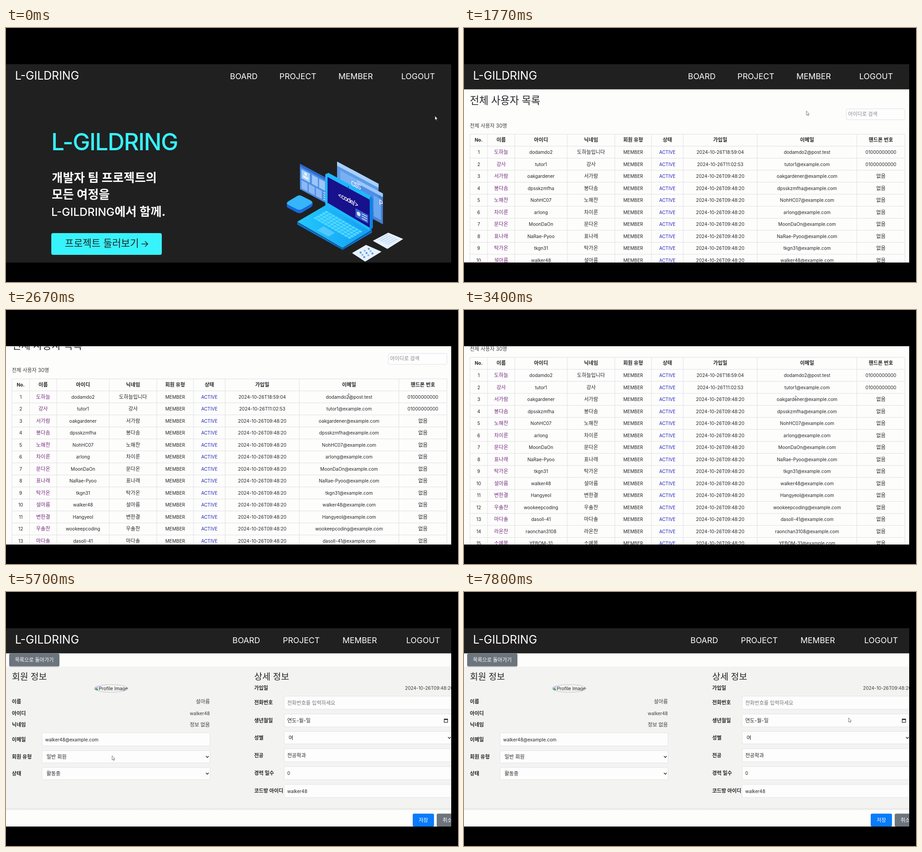
Write an HTML page that moves like this. It is 998 px wide and 561 px high and loops after 7.83 s.

```html
<!DOCTYPE html>
<html lang="ko">
<head>
<meta charset="utf-8">
<title>L-GILDRING</title>
<style>
html, body { margin: 0; width: 100%; height: 100%; overflow: hidden; background: #000; }
svg { display: block; width: 100%; height: 100%; }
text { font-family: Inter, "Noto Sans CJK KR", "Noto Sans CJK", sans-serif; white-space: pre; }
</style>
</head>
<body>
<svg id="stage" viewBox="0 0 998 561"></svg>
<script>
const LOOP = 7830;
const BRAND = 'L-GILDRING';
const DARK = '#202021', CYAN = '#37f3fb', INK = '#26262a', GRAY = '#6c757d';

const range = n => [...Array(n).keys()];
const isKorean = s => /[가-힣]/.test(s);

function text(x, y, s, size, fill = INK, opt = {}) {
  const { anchor = 'start', weight = 400, more = '' } = opt;
  return `<text x="${x}" y="${y}" font-size="${size}" fill="${fill}" text-anchor="${anchor}" font-weight="${weight}" ${more}>${s}</text>`;
}
// Body copy: Hangul is set a little larger than Latin.
const body = (x, y, s, fill, opt) => text(x, y, s, isKorean(s) ? 11.2 : 10.1, fill, opt);
const rect = (x, y, w, h, fill, more = '') =>
  `<rect x="${x}" y="${y}" width="${w}" height="${h}" fill="${fill}" ${more}/>`;
const poly = (points, fill, more = '') => `<polygon points="${points}" fill="${fill}" ${more}/>`;
const stroke = (d, color, width = 1) =>
  `<path d="${d}" fill="none" stroke="${color}" stroke-width="${width}"/>`;
const group = (id, inner) => `<g id="${id}">${inner}</g>`;
const plane = (m, inner) => `<g transform="matrix(${m})">${inner}</g>`;

function header(centers) {
  const nav = ['BOARD', 'PROJECT', 'MEMBER', 'LOGOUT'];
  return rect(0, 80, 983, 55.5, DARK) +
    text(20, 114, BRAND, 25, '#fff') +
    nav.map((s, i) => text(centers[i], 113, s, 17.7, '#fff', { anchor: 'middle' })).join('');
}
const NAV = [525, 644.5, 772, 910];
const NAV_WIDE = [530.5, 652, 781, 921];

function laptop() {
  const slope = '.88,.47,0,1,';
  const backs = plane(slope + '731,295',
      rect(0, 0, 104, 68, '#5d9bea') + rect(0, 0, 104, 9, '#a9d0fb') + rect(8, 16, 88, 46, '#78b0f2')) +
    plane(slope + '775,335',
      rect(0, 0, 65, 68, '#4c8be4', 'opacity=".9"') + rect(0, 0, 65, 8, '#9cc8fa') +
      rect(42, 15, 18, 46, '#6aa5ef') + text(55, 29, 'P', 16, '#e4f1ff', { weight: 500 })) +
    plane(slope + '731,295',
      text(35, 35, 'CSS', 15, '#e4f1ff', { weight: 500, more: 'letter-spacing="-2.6"' }));
  const left = plane(slope + '649,300',
    rect(0, 0, 80, 56, '#4d8fe5') + rect(0, 0, 80, 6, '#2f6bd0') +
    rect(4, 10, 21, 20, '#a8cffa') + '<circle cx="14" cy="16" r="3.4" fill="#e6f2ff"/>' +
    rect(8, 21, 13, 5, '#e6f2ff') +
    range(2).map(i => rect(30 + i * 18, 10, 15, 20, '#9bc6f8')).join('') +
    range(3).map(i => rect(4 + i * 18, 34, 15, 18, '#8ab9f4')).join('') +
    range(4).map(i => rect(59, 34 + i * 5, 15, 2, '#c9e2fd')).join(''));
  const cell = (c, r) => rect(c * 7.4 + 11, r * 9 + 38, 6.2, 7.4, '#4fd8ff');
  const base = poly('643,429 743,487 808,447 808,452 743,490 643,434', '#0b73d5') +
    poly('643,428 708,390 808,446 743,486', 'url(#deck)') +
    plane('1,.575,.65,-.38,643,428',
      range(11).map(c => range(5).map(r => cell(c, r)).join('')).join('') +
      rect(38, 9, 25, 22, '#4fc9fb'));
  const screen = poly('705,323 712,320 806,371 810,377 810,441 803,447 705,391', '#1fb8fa') +
    poly('806,371 810,377 810,441 803,447 803,375', '#0f83e3') +
    poly('710,329 803,379 803,441 710,386', '#17118c') +
    plane(slope + '710,329',
      text(51, 31, '&lt;code/&gt;', 15, '#fff', { anchor: 'middle', weight: 500, more: 'letter-spacing="-1.6"' }) +
      rect(70, 36, 32, 19, '#3b63d1') + '<circle cx="78" cy="45" r="4.6" fill="#d7e8ff"/>' +
      range(3).map(i => rect(86, 40 + i * 5, 13, 1.8, '#d7e8ff')).join('')) +
    '<circle cx="756" cy="351" r="1.2" fill="#0b3b8c"/>';
  const box = '<path d="M620 386V393Q620 396 624 398L643 408Q648 410 653 408L673 396Q677 393 677 390V384Z" fill="#1668d9"/>' +
    '<path d="M623 383L643 371Q648 368 653 371L673 381Q679 385 673 389L654 400Q648 403 642 400L624 391Q617 387 623 383Z" fill="#36b4fc"/>';
  const papers = poly('810,470 844,452 877,466 842,488', '#e7f1fc') +
    range(5).map(i => stroke(`M${822 + i * 5} ${468 + i * 2.4}l22 -12`, '#a9cdf3', 1.2)).join('') +
    poly('764,497 795,479 829,494 793,516', '#e7f1fc') +
    range(9).map(i => {
      const c = i % 3, r = (i - c) / 3;
      return `<circle cx="${783 + c * 9 + r * 4}" cy="${496 - c * 4 + r * 5}" r="2.3" fill="${i % 2 ? '#8fc0f3' : '#5b9ce8'}"/>`;
    }).join('');
  return backs + left + base + screen + box + papers;
}

function home() {
  const bold = { weight: 700 };
  return rect(0, 80, 983, 438, DARK) + header(NAV) +
    text(100, 270, BRAND, 51.5, CYAN, { weight: 500, more: 'letter-spacing="-1.5"' }) +
    text(101, 340, '개발자 팀 프로젝트의', 26.5, '#fff', bold) +
    text(101, 377, '모든 여정을', 26.5, '#fff', bold) +
    text(100, 415, `<tspan font-size="24.6" font-weight="500">${BRAND}</tspan>에서 함께.`, 26.5, '#fff', bold) +
    rect(100, 453, 244, 48, CYAN, 'rx="4"') +
    text(130, 483, '프로젝트 둘러보기', 21.4, '#202426') +
    stroke('M299 477H313M307 471L313 477L307 483', '#202426', 1.5) +
    laptop();
}

const PEOPLE = [
  ['도하늘', 'dodamdo2'], ['강사', 'tutor1'], ['서가람', 'oakgardener'], ['봉다솜', 'dpsskzmfha'],
  ['노해찬', 'NohHC07'], ['차이룬', 'arlong'], ['문다온', 'MoonDaOn'], ['표나래', 'NaRae-Pyoo'],
  ['탁가온', 'tkgn31'], ['설아름', 'walker48'], ['변한결', 'Hangyeol'], ['우솔찬', 'wookeepcoding'],
  ['마다솔', 'dasoll-41'], ['라온찬', 'raonchan3108'], ['소예봄', 'YEBOM-31']
];
const EDGES = [13, 52, 112, 228, 333, 414, 484, 647.5, 867.5, 973.5];
const HEADS = ['No.', '이름', '아이디', '닉네임', '회원 유형', '상태', '가입일', '이메일', '핸드폰 번호'];
const ROW = 26.53;

function list() {
  const mid = i => (EDGES[i] + EDGES[i + 1]) / 2;
  const cells = (vals, y, style) => vals.map((s, i) => body(mid(i), y, s, ...style(i))).join('');
  const lines = EDGES.map(x => `M${x} 234.5V${234.5 + ROW * 17}`).join('') +
    range(18).map(i => `M13 ${234.5 + ROW * i}H973.5`).join('');
  const times = ['18:59:04', '11:02:53'];
  const rows = PEOPLE.map(([name, id], i) => cells([
    i + 1, name, id, i ? name : name + '입니다', 'MEMBER', 'ACTIVE',
    '2024-10-26T' + (times[i] || '09:48:20'),
    id + (i ? '@example.com' : '@post.test'),
    i < 2 ? '01000000000' : '없음'
  ], 278 + ROW * i, c => [c === 1 ? '#752a80' : c === 5 ? '#2323bd' : INK, { anchor: 'middle' }])).join('');
  return rect(0, 80, 983, 700, '#fdfdfc') + header(NAV) +
    text(13, 168, '전체 사용자 목록', 22.2) +
    rect(844, 178.5, 129.5, 24, '#fefefe', 'rx="3" stroke="#e0e0ea"') +
    body(848, 193.5, '아이디로 검색', '#85858a') +
    body(13, 219.5, '전체 사용자 30명', '#3a3a3e') +
    stroke(lines, '#dfdfe9') +
    cells(HEADS, 251.3, () => [INK, { anchor: 'middle', weight: 700 }]) + rows;
}

const blank = () => rect(0, 80, 983, 438, '#fdfdfc') + header(NAV_WIDE) + body(0, 146.5, '정보 없음', '#3a3a3e');

function form() {
  const [name, id] = PEOPLE[9];
  const label = (x, y, s) => body(x, y + 4, s, INK, { weight: 700 });
  const value = (y, s) => body(450, y + 4, s, '#3a3a3e', { anchor: 'end' });
  const field = (x, w, y, h, s, pad = 7, color = INK) =>
    rect(x, y, w, h, '#fdfdfd', 'rx="3" stroke="#dfe2e8"') + body(x + pad, y + h / 2 + 4, s, color);
  const chevron = (x, y) => stroke(`M${x - 3} ${y - 1.5}l3 3l3 -3`, '#222', 1.5);
  const leftLabels = [['이름', 242], ['아이디', 268], ['닉네임', 293], ['이메일', 325.5], ['회원 유형', 364], ['상태', 401]];
  const rightLabels = [['가입일', 212], ['전화번호', 244], ['생년월일', 283.5], ['성별', 322], ['전공', 360.5], ['경력 일수', 399.5], ['코드방 아이디', 439]];
  return rect(0, 80, 983, 438, '#fdfdfc') + header(NAV_WIDE) +
    rect(0, 478, 983, 5, 'url(#shade)') + rect(0, 164.5, 983, 313.5, '#f3f3f1') +
    rect(7, 137, 111, 29, '#c8c8c8', 'rx="4"') + rect(7, 136, 111, 28, GRAY, 'rx="3"') +
    body(62.5, 153.7, '목록으로 돌아가기', '#fff', { anchor: 'middle' }) +
    text(13, 194, '회원 정보', 19.5) + text(548, 194, '상세 정보', 19.5) +
    `<g clip-path="url(#oval)">${rect(195, 207, 9, 10, '#bcd3ee')}${poly('195,217 199,211 204,217', '#58a55c')}` +
    text(205, 216.5, 'Profile Image', 10.3) + '</g>' +
    '<ellipse cx="232" cy="213" rx="37.5" ry="8.5" fill="none" stroke="#c2c2d0"/>' +
    leftLabels.map(([s, y]) => label(13, y, s)).join('') +
    value(242, name) + value(268, id) + value(293, '정보 없음') +
    field(79.5, 371, 311, 29, id + '@example.com') +
    field(79.5, 371, 350.5, 27, '일반 회원', 10) + chevron(444.5, 364) +
    field(79.5, 371, 387.5, 27, '활동중', 10) + chevron(444.5, 401) +
    rightLabels.map(([s, y]) => label(548, y, s)).join('') +
    body(881, 215.7, '2024-10-26T09:48:20', '#3a3a3e') +
    field(614, 380, 230, 29, '전화번호를 입력하세요', 7, '#77777c') +
    field(614, 380, 269.5, 28.5, '연도-월-일') +
    rect(967.5, 280.5, 7.5, 7.5, 'none', 'stroke="#222" stroke-width="1.2"') + rect(967, 280, 8.5, 2.5, '#222') +
    field(614, 380, 308, 27.5, '여', 10) + chevron(979, 322) +
    field(614, 380, 346, 29, '전공학과') +
    field(614, 380, 385.5, 29, '0') +
    field(614, 380, 425, 29, id) +
    rect(898, 489.5, 47, 28.5, '#0a7bfa', 'rx="3"') + body(921.5, 507.5, '저장', '#fff', { anchor: 'middle' }) +
    rect(951, 489.5, 48, 28.5, GRAY, 'rx="3"') + body(964, 507.5, '취소', '#fff');
}

const stage = document.getElementById('stage');
stage.innerHTML = `<defs>
  <clipPath id="view"><rect x="0" y="80" width="983" height="438"/></clipPath>
  <clipPath id="oval"><ellipse cx="232" cy="213" rx="37.5" ry="8.5"/></clipPath>
  <linearGradient id="shade" x2="0" y2="1"><stop stop-color="#e2e2e0"/><stop offset="1" stop-color="#fdfdfc"/></linearGradient>
  <linearGradient id="deck"><stop stop-color="#22c8fd"/><stop offset="1" stop-color="#129df5"/></linearGradient>
  </defs>` + rect(0, 0, 998, 561, '#000') +
  '<g clip-path="url(#view)">' +
  group('home', home()) + group('list', list()) + group('blank', blank()) + group('form', form()) +
  rect(0, 516, 88, 2, '#f1cdd3', 'id="strip"') +
  '<path id="cursor" d="M0 0V9.2L2.1 7.4L3.5 10.4L5 9.7L3.6 6.8H6.4Z" fill="#fff" stroke-width=".8"/></g>';

const el = Object.fromEntries(['home', 'list', 'blank', 'form', 'strip', 'cursor']
  .map(id => [id, document.getElementById(id)]));

// Pointer stops: time, x, y
const PATH = [
  [0, 947, 194], [740, 772, 104], [1000, 772, 104], [1550, 756, 183], [2200, 756, 184],
  [2750, 756, 184], [3250, 732, 189], [3450, 732, 189], [4550, 88, 381],
  [5350, 88, 381], [6550, 796, 288], [6850, 796, 288], [7600, 849, 278], [LOOP, 849, 278]
];
const smooth = u => { u = Math.min(1, Math.max(0, u)); return u * u * (3 - 2 * u); };

function pointer(t) {
  const i = PATH.findIndex(p => p[0] > t);
  const [t0, x0, y0] = PATH[i - 1], [t1, x1, y1] = PATH[i];
  const k = smooth((t - t0) / (t1 - t0));
  return [x0 + (x1 - x0) * k, y0 + (y1 - y0) * k];
}

function draw(t) {
  const page = t < 1000 ? 'home' : t < 4870 ? 'list' : t < 5200 ? 'blank' : 'form';
  for (const id of ['home', 'list', 'blank', 'form']) {
    el[id].style.display = id === page ? '' : 'none';
  }
  const scroll = 65 * (smooth((t - 1850) / 150) + smooth((t - 2620) / 150));
  el.list.setAttribute('transform', `translate(0 ${-scroll})`);
  el.strip.style.display = page === 'blank' || (page === 'list' && t < 1820) ? '' : 'none';
  el.cursor.setAttribute('transform', `translate(${pointer(t)})`);
  el.cursor.setAttribute('stroke', page === 'home' ? '#111' : '#55556a');
}

const start = performance.now();
function tick() {
  draw((performance.now() - start) % LOOP);
  requestAnimationFrame(tick);
}
tick();
</script>
</body>
</html>
```
